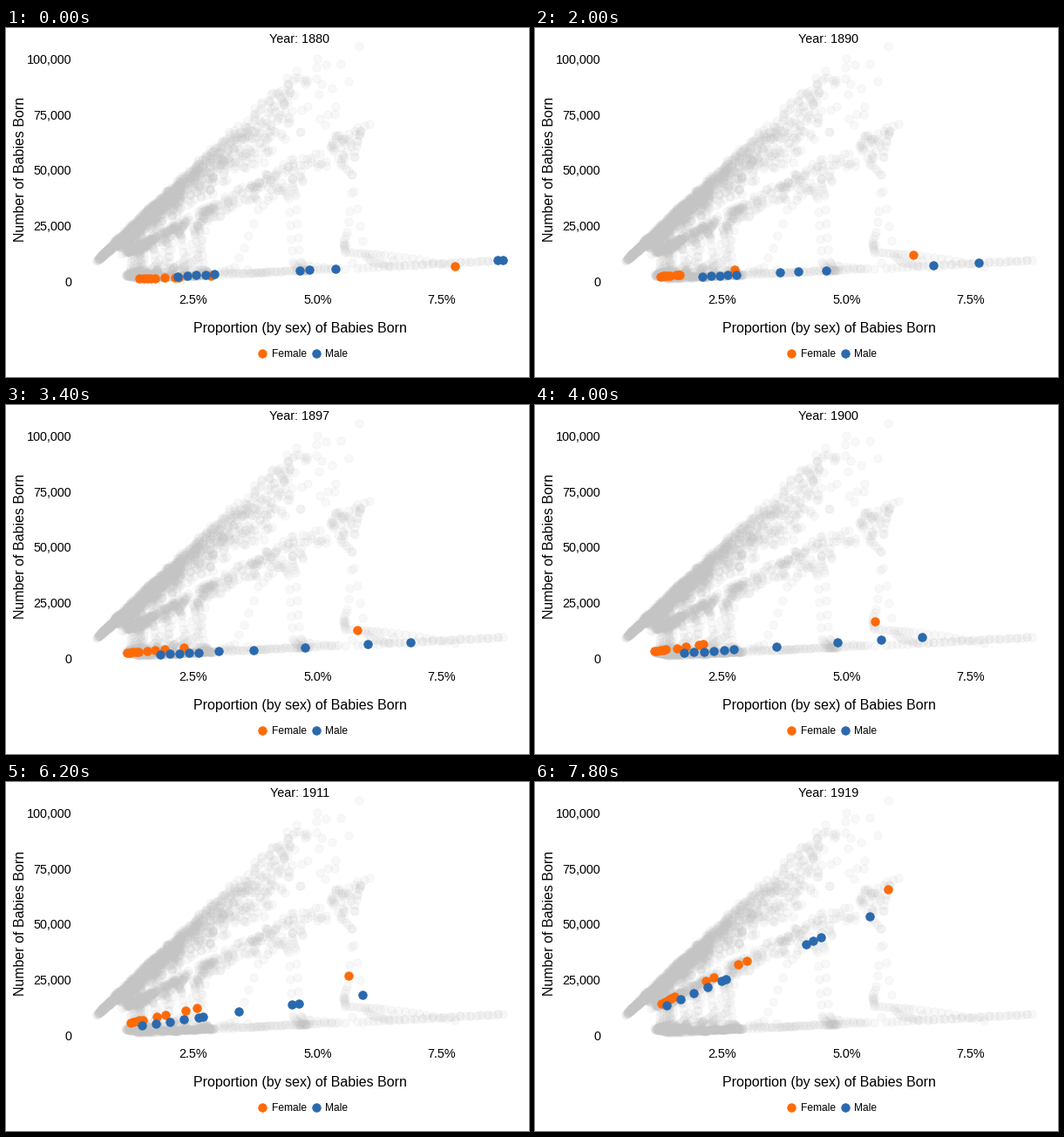
A matplotlib script that plays this animation: 600x400 px, repeating every 8000 ms.

```python
import matplotlib.pyplot as plt
import numpy as np
from matplotlib.animation import FuncAnimation

W, H, DPI = 600, 400, 100
PT = 72 / DPI
ORANGE, BLUE, GREY = "#ff6a06", "#2a69ae", "#c4c4c4"
FIRST, COUNT, LAST = 1880, 40, 2017

# Births in thousands at turning points, linear in between
TURNS = [1880, 1890, 1899, 1900, 1901, 1907, 1910, 1912, 1915, 1919,
         1930, 1940, 1947, 1957, 1975, 1990, 2017]
GIRL_BIRTHS = [91, 190, 233, 300, 239, 319, 396, 558, 984, 1130,
               1166, 1143, 1772, 2040, 1458, 1897, 1712]
BOY_BIRTHS = [110.5, 111, 106, 150, 106, 147, 194, 430, 849, 980,
              1097, 1158, 1857, 2080, 1540, 2040, 1800]

# Share in percent of a few ranks at key years
KEYS = [1880, 1890, 1900, 1907, 1919]
RANKS = [1, 2, 3, 4, 5, 6, 10]
GIRL_KEYS = [[7.76, 2.86, 2.20, 2.13, 1.92, 1.73, 1.42],
             [6.34, 2.75, 1.64, 1.63, 1.57, 1.45, 1.26],
             [5.57, 2.12, 2.04, 1.77, 1.59, 1.37, 1.14],
             [5.52, 2.38, 2.11, 1.76, 1.56, 1.46, 1.22],
             [5.83, 2.99, 2.82, 2.33, 2.18, 1.54, 1.28]]
BOY_KEYS = [[8.74, 8.63, 5.36, 4.84, 4.64, 2.93, 2.19],
            [7.66, 6.75, 4.60, 4.03, 3.67, 2.78, 2.11],
            [6.53, 5.70, 4.82, 3.59, 2.73, 2.54, 1.73],
            [6.12, 4.71, 4.57, 3.04, 2.75, 2.66, 1.51],
            [5.47, 4.49, 4.33, 4.19, 2.58, 2.49, 1.38]]

# Later years: first and tenth share, with a power curve between them
LATE = [1919, 1930, 1947, 1957, 1975, 1990, LAST]
GIRL_ENDS = [5.8, 5.5, 5.6, 3.1, 3.8, 2.5, 1.1], [1.3, 1.2, 1.4, 1.7, 1.1, 1.0, 0.58]
BOY_ENDS = [5.5, 5.6, 5.1, 4.4, 4.4, 3.2, 1.05], [1.4, 1.5, 1.8, 2.0, 1.7, 1.3, 0.7]

rng = np.random.default_rng(7)
rank = np.arange(1, 11)


def to_px(share, births):
    """Stage position of names with a share (percent) of births (thousands)."""
    return np.column_stack([214.7 + 57 * (share - 2.5),
                            290.7 - 0.0255 * share * births])


def early(year, keys, births):
    row = [np.interp(year, KEYS, col) for col in zip(*keys)]
    return to_px(np.interp(rank, RANKS, row), np.interp(year, TURNS, births))


def late(year, ends, power, births):
    top, tenth = (np.interp(year, LATE, e) for e in ends)
    share = tenth + (top - tenth) * ((10 - rank) / 9) ** power
    total = np.interp(year, TURNS, births) * rng.normal(1, 0.035)
    return to_px(share * rng.normal(1, 0.04, 10), total)


years = range(FIRST, FIRST + COUNT)
girls = [early(y, GIRL_KEYS, GIRL_BIRTHS) for y in years]
boys = [early(y, BOY_KEYS, BOY_BIRTHS) for y in years]
shadow = girls + boys
for y in range(FIRST + COUNT, LAST + 1):
    shadow.append(late(y, GIRL_ENDS, 4, GIRL_BIRTHS))
    shadow.append(late(y, BOY_ENDS, 1.5, BOY_BIRTHS))

plt.rcParams["font.family"] = "Liberation Sans"
fig = plt.figure(figsize=(W / DPI, H / DPI), dpi=DPI, facecolor="white")
ax = fig.add_axes([0, 0, 1, 1])
ax.set(xlim=(0, W), ylim=(H, 0))
ax.axis("off")


def dots(points, color, alpha=None, z=2):
    x, y = np.transpose(points)
    return ax.scatter(x, y, s=(9.4 * PT) ** 2, c=color, edgecolors=color,
                      linewidths=PT, alpha=alpha, zorder=z)


def label(x, y, text, size, ha="center", rotation=0):
    return ax.text(x, y, text, fontsize=size * PT, ha=ha, va="baseline",
                   rotation=rotation, rotation_mode="anchor", color="black")


dots(np.concatenate(shadow), GREY, alpha=0.11, z=1)
female = dots(girls[0], ORANGE, z=3)
male = dots(boys[0], BLUE, z=4)

for k in range(5):
    label(75.3, 296 - 63.75 * k, f"{25000 * k:,}", 14.4, "right")
for k in range(3):
    label(215 + 142.5 * k, 316.5, f"{2.5 * (k + 1):.1f}%", 14.4)
label(337, 349, "Proportion (by sex) of Babies Born", 16)
label(20.8, 162, "Number of Babies Born", 16, rotation=90)
title = label(336.8, 17.3, "", 14.4)

for x, name, color in [(294.2, "Female", ORANGE), (355.8, "Male", BLUE)]:
    dots([[x, 373]], color)
    label(x + 10.6, 377.3, name, 12, "left")


def update(i):
    title.set_text(f"Year: {FIRST + i}")
    female.set_offsets(girls[i])
    male.set_offsets(boys[i])
    return title, female, male


anim = FuncAnimation(fig, update, frames=COUNT, interval=200,
                     repeat=True, repeat_delay=0)
plt.show()
```
